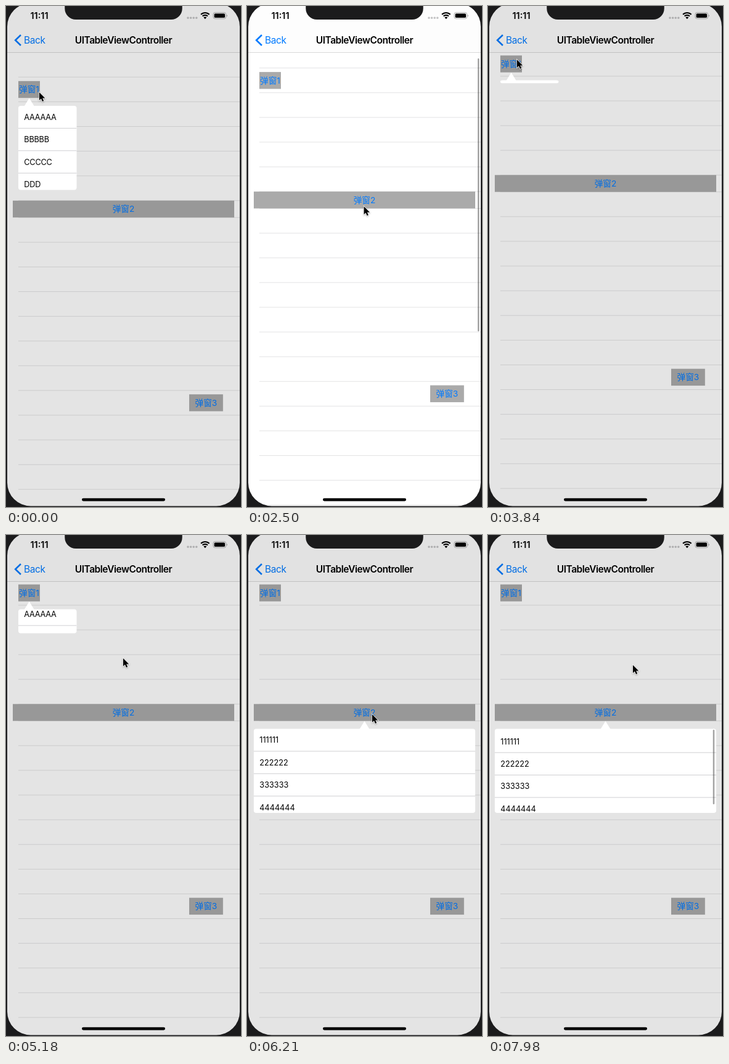
Animation, 381 px wide and 813 px high, one loop 8000 ms. Source, as an HTML page:

```html
<!DOCTYPE html>
<html lang="zh-CN">
<head>
<meta charset="utf-8">
<title>Popup menus</title>
<style>
  html, body { margin: 0; width: 100%; height: 100%; overflow: hidden; background: #1b1b1c; }
  svg { display: block; width: 100%; height: 100%; }
  text { font-family: Inter, "Noto Sans CJK SC", "Noto Sans CJK", sans-serif; }
  .sep { stroke: #e3e3e4; stroke-width: 1; }
  .btn rect { fill: #aaa; }
  .btn text { font-size: 13.65px; fill: #007aff; text-anchor: middle; }
  .title { font-size: 15.5px; font-weight: 600; letter-spacing: -.48px; text-anchor: middle; }
  .back { font-size: 15.5px; letter-spacing: -.4px; fill: #007aff; }
  .clock { font-size: 14.5px; font-weight: 600; text-anchor: middle; }
  .pop text { font-size: 12.7px; }
  .pop .letters { letter-spacing: -.2px; }
  .pop line { stroke: #cbcbcd; stroke-width: .9; }
  .bar { fill: #000; fill-opacity: .36; }
</style>
</head>
<body>
<svg viewBox="0 0 381 813">
  <defs id="defs"></defs>
  <rect x="2" width="377" height="813" fill="#fff"/>
  <g id="page"></g>
  <rect id="pageBar" class="bar" x="374" width="2.6" height="443" rx="1.3"/>

  <!-- status and navigation bars -->
  <rect x="2" width="377" height="75.5" fill="#fdfdfd"/>
  <path d="M2 75.5H379" stroke="#cfcfcf" stroke-width=".8"/>
  <text class="clock" x="54" y="20.8">11:11</text>
  <path d="M295 19.2H310" stroke="#c3c3c4" stroke-width="3.6" stroke-linecap="round" stroke-dasharray="0 4.6"/>
  <g fill="none" stroke="#000" stroke-width="2.1">
    <path d="M316 13.8A9.6 9.6 0 0 1 329.6 13.8"/>
    <path d="M318.6 16.6A6 6 0 0 1 327 16.6"/>
  </g>
  <path d="M322.8 21.2L320.3 18.6A3.6 3.6 0 0 1 325.3 18.6Z"/>
  <rect x="336" y="10.6" width="20.6" height="10" rx="2.8" fill="none" stroke="#a4a4a4" stroke-width=".9"/>
  <rect x="337.6" y="12.2" width="17.4" height="6.8" rx="1.6"/>
  <path d="M357.8 14V17.4Q359 16.8 359 15.7T357.8 14" fill="#a4a4a4"/>
  <path d="M24 47L15.2 55.5L24 64" fill="none" stroke="#007aff" stroke-width="2.6"/>
  <text class="back" x="29" y="60.8">Back</text>
  <text class="title" x="190.5" y="60.8">UITableViewController</text>

  <rect id="dim" x="2" width="377" height="813" fill-opacity=".105"/>
  <g id="pops"></g>
  <rect x="123" y="798.8" width="135" height="4.6" rx="2.3"/>

  <!-- phone edge and notch -->
  <path fill="#1b1b1c" fill-rule="evenodd" d="M0-6H381V813H0Z
    M40-4.6H341A38 38 0 0 1 379 33.4V773.4A38 38 0 0 1 341 811.4H40A38 38 0 0 1 2 773.4V33.4A38 38 0 0 1 40-4.6Z"/>
  <path fill="#1b1b1c" d="M91-5Q95.3-4 95.3 1V4A18 18 0 0 0 113.3 22H267.7A18 18 0 0 0 285.7 4V1Q285.7-4 290-5Z"/>

  <g id="cursor">
    <path d="M1 1V15L4.2 12L6.4 17L8.7 16L6.6 11.2H11Z" transform="scale(.94)" stroke="#fff" stroke-width="1.5"
      paint-order="stroke" style="filter:drop-shadow(0 1px 1px rgba(0,0,0,.3))"/>
  </g>
</svg>
<script>
const LOOP = 8000, STEP = 147.9, LEAD = 16;   // screen refreshes every STEP ms; k counts refreshes
const ROW = 36.4, CELL = 40.1, OPEN = 136.5;
const $ = id => document.getElementById(id);

function add(parent, tag, attrs, content) {
  const el = document.createElementNS('http://www.w3.org/2000/svg', tag);
  set(el, attrs);
  if (content) el.textContent = content;
  return parent.appendChild(el);
}

function set(el, attrs) {
  for (const name in attrs) el.setAttribute(name, attrs[name]);
}

const ramp = (k, from, to) => Math.min(1, Math.max(0, (k - from) / (to - from)));
const easeOut = u => u * (2 - u);
const glide = (k, from, to) => easeOut(ramp(k, from, to));
const pulse = (k, from, to) => ramp(k, from, from + 1) * (1 - ramp(k, to, to + 1));
// List dragged up, then down past its edge, then sprung back
const swing = (k, from, to) => 16 * Math.sin(2 * Math.PI * ramp(k, from, to));

function separators(y, count) {
  for (let i = 0; i < count; i++, y += CELL) {
    add($('page'), 'line', { class: 'sep', x1: 20, x2: 379, y1: y, y2: y });
  }
}

function button(x, y, w, label) {
  const g = add($('page'), 'g', { class: 'btn' });
  add(g, 'rect', { x, y, width: w, height: 27.4 });
  add(g, 'text', { x: x + w / 2, y: y + 18.6 }, label);
}

function popup(id, x, y, w, tip, rows, style) {
  const clip = add($('defs'), 'clipPath', { id });
  const mask = add(clip, 'rect', { width: w, rx: 4 });
  const root = add($('pops'), 'g', { class: 'pop' });
  add(root, 'path', { d: `M${tip - 8} .5L${tip}-12.5L${tip + 8} .5Z`, fill: '#fff' });
  const box = add(root, 'rect', { width: w, rx: 4, fill: '#fff' });
  const view = add(root, 'g', { 'clip-path': `url(#${id})` });
  const list = add(view, 'g', {});
  rows.forEach((label, i) => {
    add(list, 'text', { x: 9.3, y: (i + .5) * ROW + 4.6, class: style }, label);
    add(list, 'line', { x1: 0, x2: w, y1: (i + 1) * ROW, y2: (i + 1) * ROW });
  });
  const bar = add(view, 'rect', { class: 'bar', x: w - 5.3, width: 2.5, rx: 1.25 });

  return {
    hide() { root.style.display = 'none'; },
    show(h, scroll, alpha, shift) {
      const thumb = 121 * h / OPEN;
      root.style.display = '';
      set(root, { transform: `translate(${x} ${y - shift})` });
      set(mask, { height: h });
      set(box, { height: h });
      set(list, { transform: `translate(0 ${-scroll})` });
      set(bar, { y: Math.max(1.5, Math.min(2 + scroll, h - thumb - 2)), height: thumb, opacity: alpha });
    }
  };
}

separators(115.3, 6);
separators(343.2, 14);
button(20, 121.8, 35, '弹窗1');
button(11, 315.8, 359, '弹窗2');
button(297, 630.2, 54.8, '弹窗3');

const menu1 = popup('clip1', 20, 162, 94.5, 17.7, ['AAAAAA', 'BBBBB', 'CCCCC', 'DDD'], 'letters');
const menu2 = popup('clip2', 11, 356, 359, 179.5, ['111111', '222222', '333333', '4444444'], 'digits');

const visits = [
  { menu: menu1, open: -3, close: 11, scroll: k => swing(k, 3, 12.1), bar: k => pulse(k, 3, 14) },
  { menu: menu1, open: 25.93, close: 33.5, scroll: k => 10 * glide(k, 30, 32), bar: k => pulse(k, 30, 32) },
  { menu: menu2, open: 39.93, close: 60, scroll: k => swing(k, 46, 54.18), bar: k => pulse(k, 46, 60) }
];

// Pointer rests: arrival, departure, place
const rests = [
  [0, 0, 53, 139], [3, 3, 70, 225], [8, 8, 72, 260], [11, 13, 202, 247],
  [16, 16, 189, 339], [21, 22, 188, 298], [25, 28, 46, 86], [31, 32, 66, 150],
  [34, 36, 189, 199], [39, 45, 202, 290], [49, 52, 222, 405], [54, 55, 234, 210]
];

function pointerAt(k) {
  const i = Math.max(1, rests.findIndex(r => r[1] >= k));
  const [, leave, x0, y0] = rests[i - 1], [arrive, , x1, y1] = rests[i];
  const u = glide(k, leave, arrive);
  return [x0 + (x1 - x0) * u, y0 + (y1 - y0) * u];
}

function draw(now) {
  const k = Math.floor((now % LOOP + LEAD) / STEP);
  const shift = 41.5 * glide(k, 16, 21.1);
  let dimmed = false;

  menu1.hide();
  menu2.hide();
  for (const { menu, open, close, scroll, bar } of visits) {
    const h = OPEN * ramp(k, open, open + 2) * (1 - ramp(k, close, close + 2.1));
    if (h <= 0) continue;
    menu.show(h, scroll(k), bar(k), shift);
    dimmed = true;
  }
  $('dim').style.display = dimmed ? '' : 'none';
  set($('page'), { transform: `translate(0 ${-shift})` });
  set($('pageBar'), { y: 76 + shift * .62, opacity: pulse(k, 16, 23) });
  set($('cursor'), { transform: `translate(${pointerAt(k)})` });
}

const start = performance.now();
function tick() {
  draw(performance.now() - start);
  requestAnimationFrame(tick);
}
tick();
</script>
</body>
</html>
```
